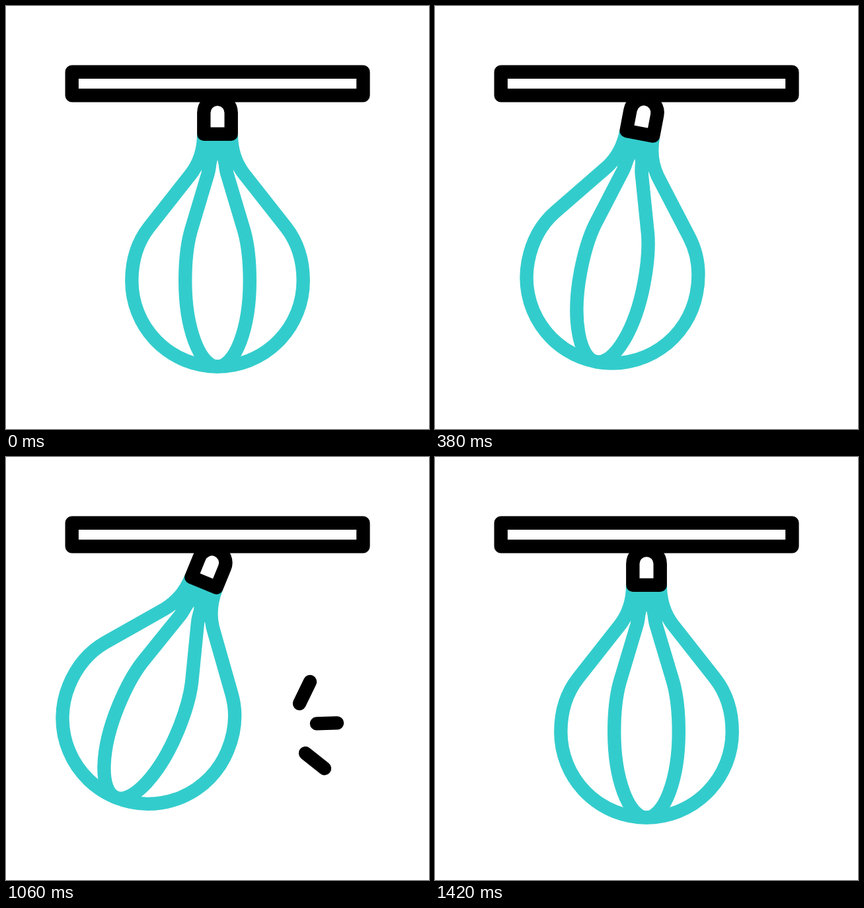
Write an HTML page that moves like this. It is 640 px wide and 640 px high and loops after 2 s.

```html
<!DOCTYPE html>
<html lang="en">
<head>
<meta charset="utf-8">
<title>Speed bag</title>
<style>
  html, body { margin: 0; width: 100%; height: 100%; overflow: hidden; background: #fff; }
  svg { display: block; width: 100%; height: 100%; }
  svg * { fill: none; stroke: #000; stroke-width: 20.4; stroke-linejoin: round; }
  .skin path { stroke: #33cccc; }
  .skin .neck { fill: #33cccc; stroke: none; }
  .spark { stroke-linecap: round; }
</style>
</head>
<body>
<svg viewBox="0 0 640 640">
  <g id="bag">
    <g class="skin">
      <path d="M299.2 194C299.2 218 293 237 280 254L216.6 334.5C198.6 357.5 190.3 386.6 190.3 415.8A129.7 129.7 0 0 0 449.7 415.8C449.7 386.6 441.4 357.5 423.4 334.5L360 254C347 237 340.8 218 340.8 194"/>
      <path d="M310 194C310 225 309 243 305.5 254L279.5 341C274 361 271.2 388 271.2 415.8C271.2 487 293 545.5 320 545.5S368.8 487 368.8 415.8C368.8 388 366 361 360.5 341L334.5 254C331 243 330 225 330 194"/>
      <path class="neck" d="M299 194H341L344 250L328 260L320 233L312 260L296 250Z"/>
    </g>
    <path d="M299.3 193.7V161.5A20.7 20.7 0 0 1 340.7 161.5V193.7Z"/>
  </g>
  <rect x="99.7" y="99.7" width="440.7" height="35.6"/>
</svg>
<script>
const LOOP = 2000, STEP = 20, PEAK = 30.8, REBOUND = -10.8;
const svg = document.querySelector('svg');
const bag = document.getElementById('bag');

// keys: steps at which the swing starts, peaks, rebounds and rests
// sparks: x, y, dx, dy of each full stroke
const hits = [
  { at: 60, run: 100, side: -1, lag: 1, keys: [0.85, 10.15, 16, 24],
    sparks: [[237.8, 383, -29.8, -42], [219.8, 411, -43.8, 5], [242.8, 447.5, -36.8, 38.5]] },
  { at: 860, run: 980, side: 1, lag: 0, keys: [-0.15, 9.25, 16.75, 23.2],
    sparks: [[440.8, 379.6, 22.4, -46.2], [463.8, 403.6, 43.4, -1.4], [447.2, 443.6, 40.6, 32.2]] }
];

const clamp = v => Math.min(1, Math.max(0, v));
const ease = v => v * v * (3 - 2 * v);

for (const hit of hits) {
  hit.lines = hit.sparks.map(() => {
    const line = document.createElementNS('http://www.w3.org/2000/svg', 'line');
    line.setAttribute('class', 'spark');
    return svg.appendChild(line);
  });
}

function stepOf(hit, t) {
  if (t < hit.at) return 0;
  return t < hit.run ? 1 : 2 + Math.floor((t - hit.run) / STEP);
}

function swing(keys, k) {
  const levels = [0, PEAK, REBOUND, 0];
  let angle = 0;
  for (let i = 0; i < 3; i++) {
    const u = clamp((k - keys[i]) / (keys[i + 1] - keys[i]));
    angle += (levels[i + 1] - levels[i]) * ease(u);
  }
  return angle;
}

function drawSparks(hit, k) {
  const tail = clamp((k - 5) / 7), head = clamp(k / 7);
  hit.lines.forEach((line, i) => {
    const [x, y, dx, dy] = hit.sparks[i];
    line.style.display = head > tail ? '' : 'none';
    line.setAttribute('x1', x + dx * tail);
    line.setAttribute('y1', y + dy * tail);
    line.setAttribute('x2', x + dx * head);
    line.setAttribute('y2', y + dy * head);
  });
}

function draw(t) {
  let angle = 0;
  for (const hit of hits) {
    const k = stepOf(hit, t);
    if (k > 0) angle += hit.side * swing(hit.keys, k);
    drawSparks(hit, k - hit.lag);
  }
  bag.setAttribute('transform', `rotate(${angle} 320 139.5)`);
}

const start = performance.now();
function tick() {
  draw((performance.now() - start) % LOOP);
  requestAnimationFrame(tick);
}
tick();
</script>
</body>
</html>
```
